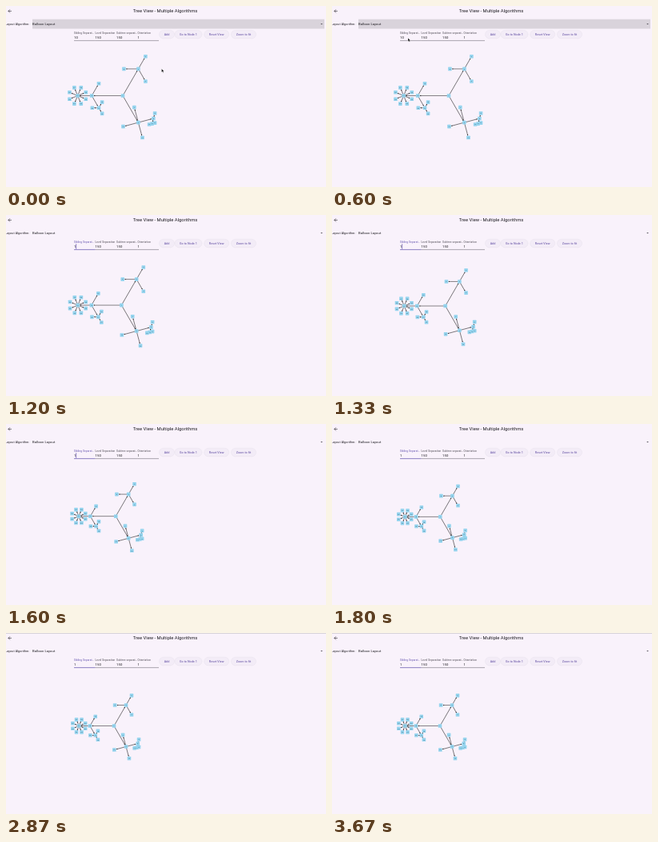
These frames come from a looping animation (400x227 px, 3.8 s). An HTML page:

```html
<!DOCTYPE html>
<html lang="en">
<head>
<meta charset="utf-8">
<title>Tree View</title>
<style>
  html, body { margin: 0; height: 100%; overflow: hidden; background: #f9f2fb; }
  svg { display: block; width: 100vw; height: 100vh; font-family: Roboto, sans-serif; fill: #1d1b20; }
  .title { font-size: 5.83px; text-anchor: middle; }
  .caption { font-size: 3.71px; letter-spacing: .066px; }
  .choice { font-size: 4.24px; letter-spacing: .04px; }
  .label { font-size: 3.18px; letter-spacing: .1px; fill: #49454f; }
  .value { font-size: 4.24px; letter-spacing: .13px; }
  .button { font-size: 3.71px; font-weight: 500; letter-spacing: .026px; text-anchor: middle; fill: #7866b0; }
  .pill { fill: #f3ecf7; stroke: #e4dde8; stroke-width: .4; }
  .line { stroke: #49454f; stroke-width: .45; }
  .focused .label { fill: #5f4fac; }
  .focused .line { stroke: #5f4fac; stroke-width: .7; }
  .edge { stroke: #111; stroke-width: .5; }
  .node { fill: #95d4ee; }
  .id { font-size: 2.3px; text-anchor: middle; fill: #31566b; }
</style>
</head>
<body>
<svg viewBox="0 0 400 227" preserveAspectRatio="none">
  <rect id="border" width="400" height=".9" fill="#d5d0d7"/>
  <path d="M6.9 6.4H2.9M4.9 4.4L2.9 6.4L4.9 8.4" fill="none" stroke="#1d1b20" stroke-width=".6"/>
  <text class="title" x="199" y="8.1">Tree View - Multiple Algorithms</text>
  <text class="caption" x="-.8" y="23.7">Layout Algorithm:</text>
  <rect id="shade" x="33" y="16.6" width="365" height="11.9" fill-opacity=".13" fill="#000"/>
  <text class="choice" x="33" y="23.8">Balloon Layout</text>
  <path d="M393.2 21.9h2.7l-1.35 1.35z" fill="#49454f"/>
  <g id="fields"></g>
  <g id="buttons"></g>
  <rect id="caret" y="36.3" width=".7" height="6.4" fill="#5f4fac"/>
  <g id="tree"></g>
  <path id="pointer" d="M0 0V4.2L1 3.3L1.7 4.9L2.4 4.6L1.7 3.1H3z" fill="#000" stroke="#fff" stroke-width=".3"/>
</svg>
<script>
const LOOP = 3800, FOCUS = 800, EDIT = 1130, SETTLE = 1900, BORDER = 2700;
const $ = id => document.getElementById(id);
const clamp = v => Math.min(1, Math.max(0, v));
const mix = (a, b, k) => a + (b - a) * k;
const rad = degrees => degrees * Math.PI / 180;

// Cubic Bézier easing, solved by bisection
function bezier(x1, y1, x2, y2) {
  const at = (a, b, u) => 3 * a * u * (1 - u) ** 2 + 3 * b * u * u * (1 - u) + u ** 3;
  return x => {
    let lo = 0, hi = 1;
    for (let i = 0; i < 20; i++) {
      const mid = (lo + hi) / 2;
      if (at(x1, x2, mid) < x) lo = mid; else hi = mid;
    }
    return at(y1, y2, lo);
  };
}
const easeOut = bezier(0, 0, .58, 1), easeInOut = bezier(.42, 0, .58, 1);

$('fields').innerHTML = [
  ['Sibling Separat…', 10], ['Level Separation', 150], ['Subtree separat…', 150], ['Orientation', 1]
].map(([label, value], i) => {
  const x = 85 + i * 26.5;
  return `<g><text class="label" x="${x}" y="35">${label}</text>
    <text class="value" x="${x}" y="41.2">${value}</text>
    <path class="line" d="M${x} 43.4h26.5"/></g>`;
}).join('');
const sibling = $('fields').firstElementChild;
const siblingValue = sibling.querySelector('.value');

$('buttons').innerHTML = [
  ['Add', 201, 19], ['Go to Node 1', 228, 34], ['Reset View', 263.2, 31], ['Zoom to fit', 297, 31]
].map(([text, x, w]) =>
  `<rect class="pill" x="${x - w / 2}" y="30.4" width="${w}" height="10.4" rx="5.2"/>
   <text class="button" x="${x}" y="36.8">${text}</text>`).join('');

// Balloon layout: children sit evenly on a ring around their parent
const ring = (radius, turn, kids) => ({ radius, turn, kids });
const leaf = ring(0, 0, []);
const leaves = n => Array(n).fill(leaf);
const tree = ring(38.8, -60, [
  ring(18, -60, leaves(3)),
  ring(19.6, -105, [leaf, ring(6.8, -75, [leaf, ring(3.6, -15, leaves(2))]), leaf, leaf]),
  ring(17.6, -60, [leaf, ring(8.2, -60, leaves(3)), ring(11, 22.5, leaves(8))])
]);

function edge(x, y, angle, length) {
  const end = length - 2.2;
  if (end < 1.5) return '';
  return `<g transform="translate(${x} ${y}) rotate(${angle})"><path class="edge" d="M0 0H${end - 1}"/>
    <path d="M${end} 0l-1.8 -.65v1.3z" fill="#111"/></g>`;
}

function drawTree(k) {
  const scale = mix(1, .775, k);
  let edges = '', boxes = '', id = 0;
  (function place({ radius, turn, kids }, x, y) {
    boxes += `<rect class="node" x="${x - 2.3}" y="${y - 2.3}" width="4.6" height="4.6" rx=".6"/>
      <text class="id" x="${x}" y="${y + .8}">${++id}</text>`;
    const r = radius * scale;
    kids.forEach((kid, i) => {
      const angle = turn + i * 360 / kids.length;
      edges += edge(x, y, angle, r);
      place(kid, x + r * Math.cos(rad(angle)), y + r * Math.sin(rad(angle)));
    });
  })(tree, mix(146, 135, k), mix(112.5, 116.5, k));
  $('tree').innerHTML = edges + boxes;
}

function caretOpacity(t) {
  if (t < FOCUS) return 0;
  if (t < 1270) return 1;
  const phase = t % 1000;
  return phase < 670 ? clamp((phase - 80) / 200) : 0;
}

function draw(t) {
  const edited = t >= EDIT;
  $('border').setAttribute('opacity', t >= BORDER ? 1 : 0);
  $('shade').setAttribute('opacity', 1 - clamp((t - 780) / 80));
  sibling.setAttribute('class', t >= FOCUS ? 'focused' : '');
  siblingValue.textContent = edited ? 1 : 10;
  $('caret').setAttribute('x', edited ? 87.4 : 90.1);
  $('caret').setAttribute('opacity', caretOpacity(t));
  drawTree(easeOut(clamp((t - EDIT) / (SETTLE - EDIT))));
  const k = easeInOut(clamp((t - 40) / 520));
  $('pointer').setAttribute('transform', `translate(${mix(194.5, 95, k)} ${mix(78.8, 40.2, k)})`);
  $('pointer').setAttribute('opacity', edited ? 0 : 1);
}

const start = performance.now();
function tick() {
  draw((performance.now() - start) % LOOP);
  requestAnimationFrame(tick);
}
tick();
</script>
</body>
</html>
```
